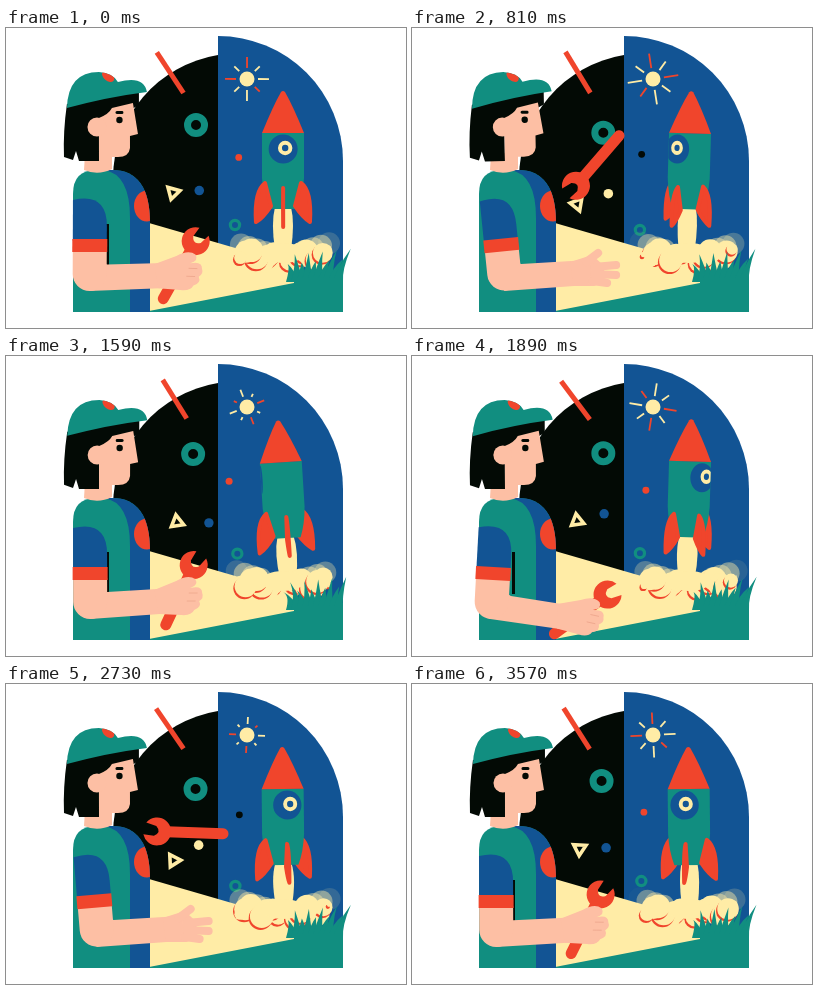
These frames come from a looping animation (400x300 px, 3600 ms). An HTML page with a canvas:

```html
<!DOCTYPE html>
<html lang="en">
<head>
<meta charset="utf-8">
<title>Rocket launch</title>
<style>
html, body { margin: 0; width: 100%; height: 100%; overflow: hidden; background: #fff; }
canvas { display: block; }
</style>
</head>
<body>
<canvas id="stage" width="400" height="300"></canvas>
<script>
const ctx = document.getElementById('stage').getContext('2d');
const TEAL = '#118e80', BLUE = '#125494', RED = '#f0452c', CREAM = '#ffeca6', SKIN = '#fdbfa4', BLACK = '#030a05';
const { sin, cos, min, max, PI } = Math, TAU = 2 * PI, DEG = PI / 180;
const CYCLE = 1800;

const mix = (a, b, u) => a + (b - a) * u;
function ease(from, to, t) {
  const u = max(0, min(1, (t - from) / (to - from)));
  return u * u * (3 - 2 * u);
}
// A soft pulse that repeats every cycle.
function pulse(t, peak, width) {
  const gap = (t - peak + 2.5 * CYCLE) % CYCLE - CYCLE / 2;
  return Math.exp(-((gap / width) ** 2));
}

function shape(d, fill) {
  ctx.fillStyle = fill;
  ctx.fill(new Path2D(d));
}
function line(d, color, width, cap = 'round') {
  Object.assign(ctx, { strokeStyle: color, lineWidth: width, lineCap: cap, lineJoin: 'round' });
  ctx.stroke(new Path2D(d));
}
function oval(x, y, rx, ry, fill) {
  ctx.beginPath();
  ctx.ellipse(x, y, rx, ry, 0, 0, TAU);
  ctx.fillStyle = fill;
  ctx.fill();
}
const dot = (x, y, r, fill) => oval(x, y, r, r, fill);
function ring(x, y, r, width, color) {
  ctx.beginPath();
  ctx.arc(x, y, r, 0, TAU);
  ctx.strokeStyle = color;
  ctx.lineWidth = width;
  ctx.stroke();
}
function group(draw) {
  ctx.save();
  draw();
  ctx.restore();
}
function spin(x, y, degrees) {
  ctx.translate(x, y);
  ctx.rotate(degrees * DEG);
  ctx.translate(-x, -y);
}

function backdrop() {
  shape('M107 283V150A125 125 0 0 1 212 27V283Z', BLACK);
  shape('M212 8A125 125 0 0 1 337 133V283H212Z', BLUE);
  shape('M143 195L288 237V264L143 284Z', CREAM);
  shape('M143 283L288 255V247H337V284H143Z', TEAL);
}

function sun(t) {
  const swell = 4 * cos(TAU * (t - 900) / 1200);
  for (let i = 0; i < 8; i++) {
    group(() => {
      spin(241, 51, 45 * i + t * 0.1);
      const reach = 19 + swell + (i % 2 ? -1 : 3);
      line(`M241 40V${51 - reach}`, i % 3 ? CREAM : RED, 1.8, 'butt');
    });
  }
  dot(241, 51, 7.5, CREAM);
}

function orbitDot(phi, r, darkSide, lightSide) {
  const u = 26 * cos(phi), v = 14 * sin(phi);
  const x = 213 - (u + v) * Math.SQRT1_2, y = 146 + (u - v) * Math.SQRT1_2;
  [[0, 212, darkSide], [212, 188, lightSide]].forEach(([left, width, color]) => group(() => {
    ctx.beginPath();
    ctx.rect(left, 0, width, 300);
    ctx.clip();
    dot(x, y, r, color);
  }));
}

function floaters(t) {
  const w = TAU * t / CYCLE, s = sin(w), c = cos(w);
  ring(190 + 4.3 * s, 101 - 4 * c, 8.5, 7, TEAL);
  ring(229 - 3.5 * s, 199.5 - 2.5 * c, 4.6, 3.2, TEAL);

  group(() => {
    ctx.translate(167 - 3.5 * cos(2 * w - 36 * DEG), 43 + 1.7 * cos(2 * w));
    ctx.rotate((53 - 6 * cos(2 * w - 128 * DEG)) * DEG);
    const half = 22.5 + 1.8 * cos(2 * w);
    line(`M${-half} 0H${half}`, RED, 5, 'butt');
  });

  group(() => {
    ctx.translate(167 - 6 * s, 170.5 - 6 * c);
    ctx.rotate((t * 0.4 - 15) * DEG);
    ctx.lineJoin = 'miter';
    ctx.strokeStyle = CREAM;
    ctx.lineWidth = 3.6;
    ctx.stroke(new Path2D('M7.2 0L-3.6 6.2V-6.2Z'));
  });

  const phi = w + 9 * DEG;
  orbitDot(phi, 4.1 + 0.7 * cos(phi), BLUE, BLACK);
  orbitDot(phi + PI, 4.1 - 0.7 * cos(phi), CREAM, RED);
}

function fin(phi) {
  const s = sin(phi), drop = 5 * cos(phi);
  const p = (r, y) => `${r * s} ${y + drop}`;
  const d = `M${p(18, 155)}Q${p(29, 163)} ${p(27, 194)}Q${p(20, 190)} ${p(12, 178)}Z`;
  shape(d, RED);
  line(d, RED, 4);
}

function rocket(t) {
  const w = TAU * t / CYCLE, sway = sin(w), roll = 2 * w;
  const fins = [0, 1, 2, 3].map(k => roll + k * PI / 2);
  group(() => {
    ctx.translate(277, 2.8 * sway * sway);
    spin(0, 140, 5.5 * sway);
    fins.filter(a => cos(a) < -0.01).forEach(fin);
    const flare = 1.2 * sin(8 * w);
    shape(`M-8 179H8Q${12 + flare} 195 8 222H-8Q${-12 - flare} 195 -8 179Z`, CREAM);
    const hull = new Path2D('M-21 105H21V150Q20 168 15 181H-15Q-20 168 -21 150Z');
    ctx.fillStyle = TEAL;
    ctx.fill(hull);
    if (cos(roll) > 0) group(() => {
      ctx.clip(hull);
      const narrow = max(0.1, cos(roll));
      oval(21 * sin(roll), 121, 14.5 * narrow, 14.5, BLUE);
      oval(2 + 25 * sin(roll), 120, 7.2 * narrow, 7.2, CREAM);
      oval(2 + 25 * sin(roll), 120, 3.2 * narrow, 3.2, BLUE);
    });
    shape('M-2 64Q0 62 2 64Q10 78 21 105H-21Q-10 78 -2 64Z', RED);
    fins.filter(a => cos(a) >= -0.01).forEach(fin);
  });
}

function smoke(t) {
  const drift = (i, count) => ({ p: (i / count + t / CYCLE) % 1, side: i % 2 ? 1 : -1 });
  for (let i = 0; i < 8; i++) {
    const { p, side } = drift(i, 8);
    ctx.globalAlpha = 0.45 * min(1, 3 * (1 - p));
    dot(277 + side * (18 + 32 * p), 224 - 10 * p, 11, CREAM);
  }
  ctx.globalAlpha = 1;
  for (let i = 0; i < 16; i++) {
    const { p, side } = drift(i, 16);
    const r = (9 + 3 * sin(PI * p)) * min(1, 5 * (1 - p));
    const x = 277 + side * (4 + 44 * p), y = 230 - 5 * p + 5 * sin(i * 2.4);
    if (i % 3) dot(x - 1.2, y + 2, r, RED);
    dot(x, y, r, CREAM);
  }
  oval(277, 225, 22, 10, CREAM);
}

function grass(t) {
  const sway = 4 * cos(2 * TAU * (t - 40) / CYCLE);
  for (let i = 0; i < 10; i++) {
    const x = 286 + 5.2 * i, tip = x + 1.8 * (i - 4.5) + sway, y = 236 - 9 * (i % 2) - 0.7 * i;
    shape(`M${x - 6} 254Q${x - 2} 240 ${tip} ${y}Q${x + 3} 242 ${min(337, x + 6)} 254Z`, TEAL);
  }
  shape('M288 262V250H337V270H288Z', TEAL);
}

function torso() {
  const side = 'H106Q144 142 144 195V284';
  shape(`M67 284V166Q67 142 90 142${side}Z`, TEAL);
  shape(`M98 142${side}H124V190Q124 146 98 142Z`, BLUE);
  group(() => {
    ctx.clip(new Path2D(`M98 142${side}Z`));
    oval(141, 178, 13, 15.5, RED);
  });
  line('M101.5 196V238', BLACK, 3, 'butt');
}

function head(t) {
  const tilt = 3.5 * pulse(t, 1260, 200) - 3.8 * pulse(t, 520, 260);
  const lid = 1 - 0.55 * pulse(t, 1260, 60);
  shape('M79 125H106V141Q92 148 78 142Z', SKIN);
  group(() => {
    spin(97, 135, tilt);
    shape('M61 76Q57 104 58 129L67 132L70 123L73 133H93V100L133 77V64Z', BLACK);
    shape('M93 90Q103 86 106 80L127 75L132 106L124 108V120Q123 129 112 129H106V137H93Z', SKIN);
    dot(91, 99, 9.5, SKIN);
    oval(113.5, 92, 3.2, 3.2 * lid, BLACK);
    line('M111 84.5L116 84.5', BLACK, 3);
    const cap = 'M61 80Q62 44 93 44Q107 45 112 54Q138 47 141 64Q101 69 61 80Z';
    shape(cap, TEAL);
    group(() => {
      ctx.clip(new Path2D(cap));
      spin(103, 49, 40);
      oval(102, 49, 7, 4.5, RED);
    });
  });
}

// Shoulder and elbow angles, and how far the elbow swings sideways.
function armPose(t) {
  const shoulder = 4.5 * pulse(t, 120, 90) - 6.2 * pulse(t, 700, 450);
  const elbow = 15 * pulse(t, 130, 90) + 5 * pulse(t, 390, 90) + 3 * pulse(t, 1220, 50);
  return { shoulder, elbow, shift: -80 * sin(shoulder * DEG) };
}

function wrench(t) {
  const { elbow, shift } = armPose(t), a = elbow * DEG;
  const held = {
    x: 84 + shift + 90 * cos(a) + 10 * sin(a),
    y: 248 + 90 * sin(a) - 10 * cos(a),
    turn: 2.3 * elbow - 65 + (t > 700 ? 360 : 0)
  };
  const flying = { x: 197 - 0.015 * t, y: 132 + 0.000566 * (t - 760) ** 2, turn: 0.427 * (t - 390) - 49 };
  const free = ease(270, 390, t) - ease(1170, 1230, t);
  group(() => {
    ctx.translate(mix(held.x, flying.x, free), mix(held.y, flying.y, free));
    ctx.rotate(mix(held.turn, flying.turn, free) * DEG);
    line('M-34 0H22', RED, 11);
    spin(32, 0, 12);
    ctx.beginPath();
    ctx.arc(32, 0, 14, 0.45, TAU - 0.45);
    ctx.lineTo(34, -5);
    ctx.quadraticCurveTo(27, 0, 34, 5);
    ctx.fillStyle = RED;
    ctx.fill();
  });
}

function arm(t) {
  const { shoulder, elbow, shift } = armPose(t);
  group(() => {
    ctx.translate(shift, 0);
    spin(84, 248, elbow);
    shape('M84 263L168 257V232L101 236L84 230Z', SKIN);
    if (t < 350 || t > 1190) {
      shape('M148 234L170 225Q182 218 189 223Q193 229 184 232Q196 229 196 237Q198 242 193 245Q196 251 188 254Q185 260 175 259L153 258Z', SKIN);
      line('M183 237H191M181 245H189', '#eda68c', 0.8);
    } else {
      shape('M150 234L172 227L184 238V254L174 258H153Z', SKIN);
      line('M166 234L178 225', SKIN, 8);
      line('M174 239L196 237M174 246L196 247M172 253L187 255', SKIN, 8);
    }
  });
  group(() => {
    spin(83, 165, shoulder);
    shape('M67 222H101V246A17 17 0 0 1 67 246Z', SKIN);
    shape('M67 172Q101 164 101 198V213H67Z', BLUE);
    shape('M66.5 211H101.5V224H66.5Z', RED);
  });
}

function render(now) {
  const time = now % (2 * CYCLE), t = time % CYCLE;
  ctx.clearRect(0, 0, 400, 300);
  backdrop();
  sun(time);
  floaters(t);
  rocket(t);
  smoke(t);
  grass(t);
  torso();
  head(t);
  wrench(t);
  arm(t);
  requestAnimationFrame(render);
}
render(0);
</script>
</body>
</html>
```
